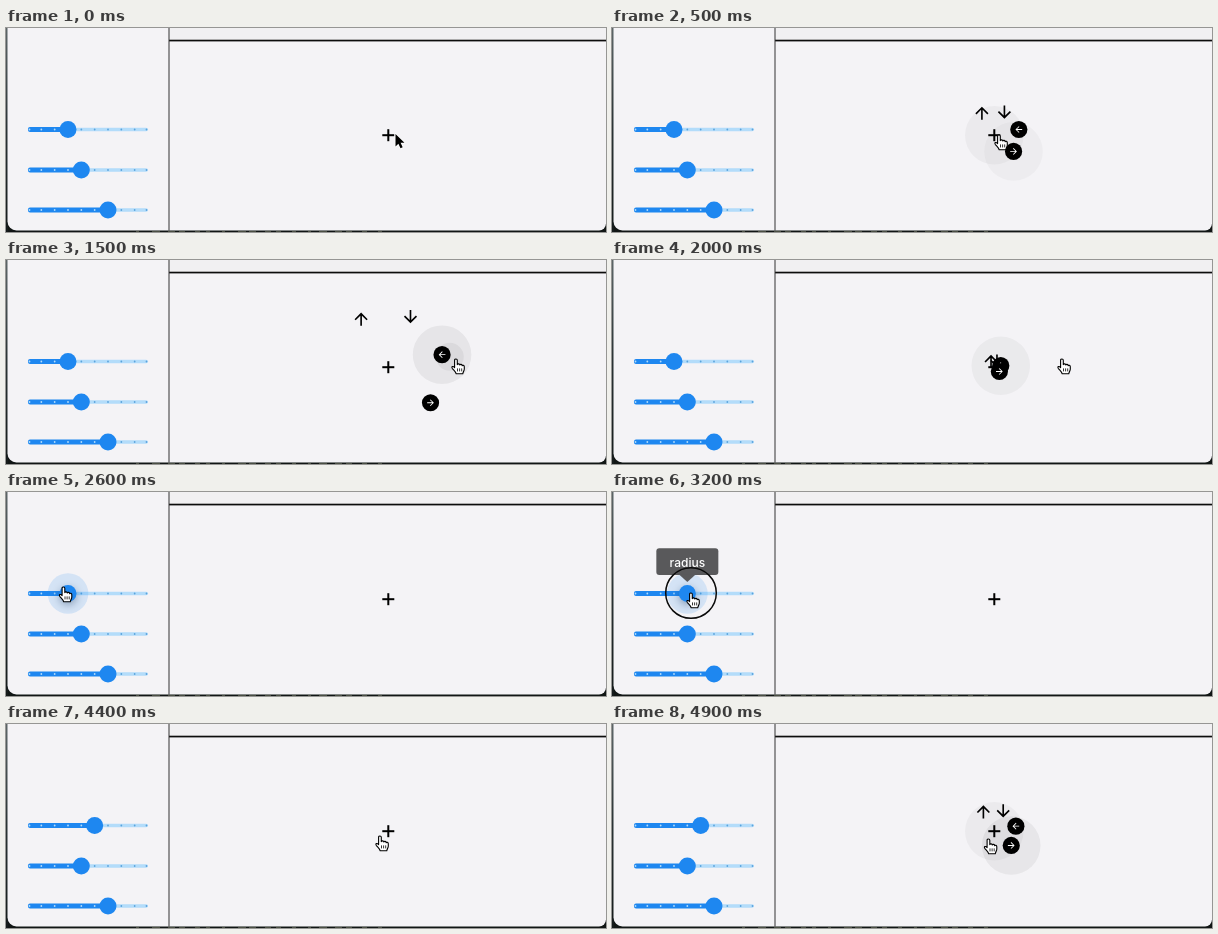
Recreate the animation shown at these times as an HTML page with a canvas. Size 600 by 204 pixels, loop 5 s.

```html
<!DOCTYPE html>
<html lang="en">
<head>
<meta charset="utf-8">
<title>Radial menu</title>
<style>
  html, body { margin: 0; width: 100%; height: 100%; overflow: hidden; background: #111615; }
  canvas { display: block; width: 600px; height: 204px; }
</style>
</head>
<body>
<canvas id="stage"></canvas>
<script>
const W = 600, H = 204, LOOP = 5000, STEP = 100;
const BLUE = '#1e87f0', TAU = Math.PI * 2;
const HUB = { x: 382.3, y: 107.2 };
const RAIL = { x: 22, step: 120 / 9, rows: [101.5, 142, 182] };
const PRESS = 2750, RELEASE = 4100;

const canvas = document.getElementById('stage');
const ratio = window.devicePixelRatio || 1;
canvas.width = W * ratio;
canvas.height = H * ratio;
const g = canvas.getContext('2d');

const ARROW = new Path2D('M-8 0L-6.6 1.4L-1 -4.2V8H1V-4.2L6.6 1.4L8 0L0 -8Z');
const POINTER = new Path2D('M0 0V12.4L2.9 9.7L5 14.2L7.2 13.2L5.1 8.8H9Z');
const HAND = new Path2D('M-1.4 8.2V1.2C-1.4 -.5 1.3 -.5 1.3 1.2V5.6C1.6 4.5 3.7 4.7 3.8 6' +
  'C4.2 5 6.1 5.2 6.2 6.7C6.8 5.9 8.3 6.3 8.3 7.7V10C8.3 12 7 12.6 6.8 14.8H.2' +
  'C-.2 12.8 -2.4 11.2 -3.8 9.2C-4.8 7.6 -3 6.8 -1.4 8.6Z');
const CREASES = new Path2D('M1.5 9.4V12.4M3.6 9.4V12.4M5.7 9.4V12.4');

// time, x, y of the pointer tip
const PATH = [
  [0, 389.5, 106], [200, 389, 106], [400, 387, 107], [650, 387, 107],
  [1250, 450, 99], [2000, 450, 99], [2500, 60, 95], [2600, 57.5, 95],
  [2800, 62, 101], [3200, 79, 101], [4000, 85.5, 101], [4100, 86, 101],
  [4400, 374, 112], [4600, 376.5, 115], [5000, 376.5, 115]
];

const clamp = (v, a = 0, b = 1) => Math.min(b, Math.max(a, v));
const ramp = (t, start, len) => clamp((t - start) / len);
const pulse = (t, on, off, len = 150) => Math.min(ramp(t, on, len), 1 - ramp(t, off, len));

// cubic-bezier(.25, .1, .25, 1)
function ease(x) {
  if (x <= 0 || x >= 1) return clamp(x);
  let lo = 0, hi = 1, u = 0.5;
  for (let i = 0; i < 24; i++) {
    u = (lo + hi) / 2;
    const bx = 0.75 * u * (1 - u) + u * u * u;
    if (bx < x) lo = u; else hi = u;
  }
  return 0.3 * u * (1 - u) * (1 - u) + 3 * u * u * (1 - u) + u * u * u;
}

function cursorAt(t) {
  let i = 1;
  while (i < PATH.length - 1 && PATH[i][0] < t) i++;
  const [t0, x0, y0] = PATH[i - 1], [t1, x1, y1] = PATH[i];
  const k = ramp(t, t0, t1 - t0), s = k * k * (3 - 2 * k);
  return { x: x0 + (x1 - x0) * s, y: y0 + (y1 - y0) * s };
}

function disc(x, y, r, fill) {
  g.beginPath();
  g.arc(x, y, r, 0, TAU);
  g.fillStyle = fill;
  g.fill();
}

function bar(x, y, w, h, r, fill) {
  g.beginPath();
  g.roundRect(x, y, w, h, r);
  g.fillStyle = fill;
  g.fill();
}

function glyph(x, y, angle, scale, fill) {
  g.save();
  g.translate(x, y);
  g.rotate(angle);
  g.scale(scale, scale);
  g.fillStyle = fill;
  g.fill(ARROW);
  g.restore();
}

function drawWindow() {
  g.fillStyle = '#111615';
  g.fillRect(0, 0, W, H);
  const edge = g.createLinearGradient(0, 0, 0, H);
  edge.addColorStop(0, '#5d6668');
  edge.addColorStop(0.5, '#2a3335');
  edge.addColorStop(1, '#151b1b');
  g.fillStyle = edge;
  g.fillRect(0, 0, 2, H);
  g.fillStyle = '#4a4f43';
  for (let i = 0; i < 18; i++) g.fillRect(130 + i * 14 + (i * 7) % 5, 203, 3 + (i * 5) % 6, 1);
  bar(1.5, -20, W - 1.5, 222.5, [0, 0, 7, 9], '#f4f3f6');
  g.fillStyle = '#f1f0f2';
  g.fillRect(163, 0, W - 163, 12);
  g.fillStyle = '#0c0c0c';
  g.fillRect(163, 11.7, W - 163, 1.7);
  g.fillStyle = '#333';
  g.fillRect(162.5, 0, 1, 202.5);
}

function drawSlider(y, value, halo) {
  const x = RAIL.x + value * RAIL.step;
  bar(RAIL.x, y - 1.8, 120, 3.6, 1.8, '#b3dcfa');
  bar(RAIL.x, y - 2.6, x - RAIL.x, 5.2, 2, BLUE);
  for (let i = 0; i < 10; i++) {
    const mx = clamp(RAIL.x + i * RAIL.step, RAIL.x + 1.5, RAIL.x + 118.5);
    disc(mx, y, 0.9, i < value ? '#b3dcfa' : '#5ba3dc');
  }
  if (halo) disc(x, y, 20.3 * (0.6 + 0.4 * halo), `rgba(30,135,240,${0.15 * halo})`);
  g.save();
  if (halo) {
    g.shadowColor = `rgba(20,50,90,${0.4 * halo})`;
    g.shadowBlur = 9 * ratio;
    g.shadowOffsetY = 3 * ratio;
  }
  disc(x, y, 8.5, BLUE);
  g.restore();
}

function drawTip(x, alpha) {
  if (!alpha) return;
  g.save();
  g.globalAlpha = alpha;
  bar(x - 31, 56.3, 62, 26.7, 3, '#59595b');
  g.beginPath();
  g.moveTo(x - 8, 82.8);
  g.lineTo(x + 8, 82.8);
  g.lineTo(x, 90);
  g.fill();
  g.fillStyle = '#fff';
  g.font = '500 12px Inter, Roboto, sans-serif';
  g.textAlign = 'center';
  g.fillText('radius', x, 75);
  g.restore();
}

function drawMenu(t) {
  const again = t > 4500;
  const open = again ? ease(ramp(t, 4850, 250))
    : ease(ramp(t, 432, 250)) - ease(ramp(t, 1852, 250));
  const reach = (again ? 75 : 55.2) * open;
  const spots = [0, 1, 2, 3].map(i => {
    const a = (240.5 + 53.2 * i) * Math.PI / 180;
    return { x: HUB.x + Math.cos(a) * reach, y: HUB.y + Math.sin(a) * reach };
  });
  const halo = (p, a) => a > 0 && disc(p.x, p.y, 29.3, `rgba(0,0,0,${a})`);

  halo(HUB, 0.036 * (again ? ramp(t, 4400, 150) : pulse(t, 250, 850)));
  if (open > 0) {
    const [up, down, left, right] = spots;
    halo(right, 0.055 * (again ? ramp(t, 4830, 70) : pulse(t, 430, 620)));
    halo(left, 0.06 * pulse(t, 1000, 1950));
    const wave = ramp(t, 1380, 400);
    if (wave > 0 && t < 1950) {
      g.save();
      g.beginPath();
      g.arc(left.x, left.y, 29.3, 0, TAU);
      g.clip();
      const pull = 1 - wave;
      disc(left.x + 11 * pull, left.y + 3 * pull, 5 + 30 * wave, `rgba(0,0,0,${0.05 * (1 - ramp(t, 1650, 300))})`);
      g.restore();
    }
    glyph(up.x, up.y, 0, 0.82, '#000');
    glyph(down.x, down.y, Math.PI, 0.82, '#000');
    disc(left.x, left.y, 8.6, '#000');
    glyph(left.x, left.y, -Math.PI / 2, 0.42, '#fff');
    disc(right.x, right.y, 8.6, '#000');
    glyph(right.x, right.y, Math.PI / 2, 0.42, '#fff');
  }
  g.fillStyle = '#000';
  g.fillRect(HUB.x - 6, HUB.y - 1, 12, 2);
  g.fillRect(HUB.x - 1, HUB.y - 6, 2, 12);
}

function drawCursor(t, p) {
  const arrow = t < 300 || (t > 2050 && t < 2500) || (t > 4150 && t < 4400);
  g.save();
  g.translate(p.x, p.y);
  g.lineJoin = 'round';
  if (arrow) {
    g.strokeStyle = '#fff';
    g.lineWidth = 1.6;
    g.stroke(POINTER);
    g.fillStyle = '#000';
    g.fill(POINTER);
  } else {
    g.fillStyle = '#fff';
    g.fill(HAND);
    g.strokeStyle = '#000';
    g.lineWidth = 1.1;
    g.stroke(HAND);
    g.lineWidth = 0.8;
    g.stroke(CREASES);
  }
  g.restore();
}

function draw(t) {
  g.setTransform(ratio, 0, 0, ratio, 0, 0);
  const p = cursorAt(t);
  const grip = cursorAt(clamp(t, PRESS, RELEASE)).x;
  const radius = t < PRESS ? 3 : Math.round((grip - RAIL.x) / RAIL.step);

  drawWindow();
  drawMenu(t);
  drawSlider(RAIL.rows[0], radius, pulse(t, 2400, RELEASE));
  drawSlider(RAIL.rows[1], 4, 0);
  drawSlider(RAIL.rows[2], 6, 0);
  drawTip(RAIL.x + radius * RAIL.step, pulse(t, PRESS, RELEASE));
  if (t > PRESS && t < RELEASE) {
    g.beginPath();
    g.arc(p.x, p.y, 25.3, 0, TAU);
    g.strokeStyle = '#0a0a0a';
    g.lineWidth = 1.5;
    g.stroke();
  }
  drawCursor(t, p);
}

const start = performance.now();
function tick() {
  const t = (performance.now() - start) % LOOP;
  draw(Math.floor(t / STEP) * STEP);
  requestAnimationFrame(tick);
}
tick();
</script>
</body>
</html>
```
